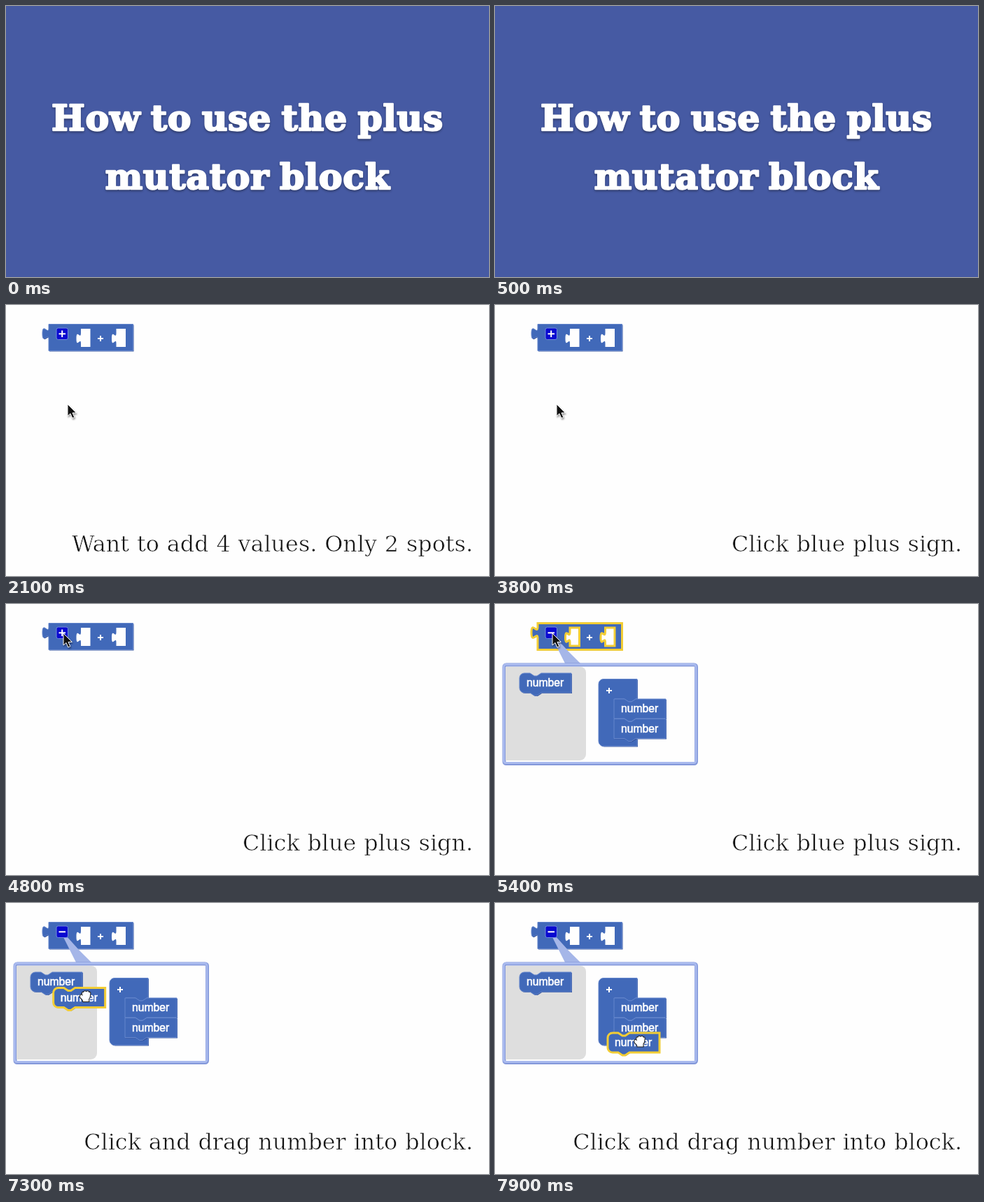
Write an HTML page that moves like this. It is 690 px wide and 388 px high and loops after 8 s.

```html
<!DOCTYPE html>
<html lang="en">
<head>
<meta charset="utf-8">
<title>How to use the plus mutator block</title>
<style>
  html, body { margin: 0; width: 100%; height: 100%; overflow: hidden; background: #fefefe; }
  svg { display: block; width: 690px; height: 388px; }
  .title { font: bold 50.5px "DejaVu Serif", serif; letter-spacing: .7px; word-spacing: -3.7px;
    fill: #fff; stroke: #fff; stroke-width: 2.4; stroke-linejoin: round; text-anchor: middle;
    filter: drop-shadow(0 2px 1.5px #0005); }
  /* the pale outline thins the strokes of the letters */
  #caption { font: 31.8px "DejaVu Serif", serif; word-spacing: .8px; fill: #111;
    stroke: #fefefe; stroke-width: .7; text-anchor: end; }
  .label { font: 15.7px "Liberation Sans", Arial, sans-serif; fill: #fff; stroke: #fff; stroke-width: .6; }
  .shade { fill: #2f4f98; }
  .body { fill: #4169b9; stroke: var(--edge, #6486cc); stroke-width: var(--line, 1); }
  .socket { fill: #fefefe; stroke: var(--edge, none); stroke-width: var(--line, 0); }
  .selected { --edge: #f2cd35; --line: 3; }
  .plus { stroke: #fff; stroke-width: 2; fill: none; }
</style>
</head>
<body>
<svg viewBox="0 0 690 388">
  <defs>
    <path id="numberShape" d="M0 7a7 7 0 0 1 7-7h8l6 4h4l6-4H74V28H31l-6 4h-4l-6-4H7a7 7 0 0 1-7-7z"/>
    <path id="stackedShape" d="M0 0H15l6 4h4l6-4H74V28H31l-6 4h-4l-6-4H0z"/>
    <path id="listShape" d="M155 107.5H203V136H201l-6 4h-4l-6-4H171V193H203V203.5H155a7 7 0 0 1-7-7V114.5a7 7 0 0 1 7-7z"/>
    <path id="sumShape" d="M61 27.5H181.5V65.5H61V49c0-11-9 9-9-8s9 3 9-8z"/>
    <path id="socket" class="socket" d="M107 34H120.5V60H107V55c0-10-6.5 8-6.5-7s6.5 3 6.5-8z"/>
    <g id="number">
      <use href="#numberShape" class="shade" x="1" y="1"/>
      <use href="#numberShape" class="body"/>
      <text class="label" x="10" y="19">number</text>
    </g>
    <g id="stacked">
      <use href="#stackedShape" class="shade" x="1" y="1"/>
      <use href="#stackedShape" class="body"/>
      <text class="label" x="10" y="19">number</text>
    </g>
    <g id="sum">
      <use href="#sumShape" class="shade" x="1" y="1"/>
      <use href="#sumShape" class="body"/>
      <use href="#socket"/>
      <use href="#socket" x="50.5"/>
      <path class="plus" d="M131 48h8M135 44v8"/>
    </g>
  </defs>

  <g id="intro">
    <rect width="690" height="388" fill="#465aa3"/>
    <text class="title" x="345" y="177.8">How to use the plus</text>
    <text class="title" x="345" y="262.3">mutator block</text>
  </g>

  <g id="lesson">
    <use id="sumBlock" href="#sum"/>
    <g id="bubble">
      <path d="M81 47L101 87H124Q104 68 86 47z" fill="#a5b6e8"/>
      <rect x="13" y="87" width="274.5" height="141.5" rx="3" fill="#fefefe" stroke="#8398da" stroke-width="5"/>
      <rect x="12.5" y="86.5" width="274.5" height="141" rx="3" fill="none" stroke="#a9baee" stroke-width="3"/>
      <path d="M15 90H122a8 8 0 0 1 8 8V215a9 9 0 0 1-9 9H15z" fill="#dedede"/>
      <use href="#number" x="35" y="99"/>
      <use href="#listShape" class="shade" x="1" y="1"/>
      <use href="#listShape" class="body"/>
      <path class="plus" d="M159 124h8M163 120v8"/>
      <use href="#stacked" x="170" y="136"/>
      <use href="#stacked" x="170" y="164.5"/>
      <use id="dragged" class="selected" href="#number"/>
    </g>
    <rect x="72" y="33" width="16.5" height="16.5" rx="2.5" fill="#0909d0" stroke="#7189dd"/>
    <path class="plus" d="M75.5 41.3h9.5"/>
    <path id="upright" class="plus" d="M80.2 36.5v9.5"/>
    <text id="caption" x="667" y="353"></text>

    <path id="arrow" d="M0 0V17L4 13.5 6.8 20 9.8 18.7 7 12.4H12.3z" fill="#111" stroke="#fff"
      style="filter:drop-shadow(1px 2px 1px #0006)"/>
    <path id="beam" d="M-4-9q4 0 4 3V6q0 3-4 3M4-9q-4 0-4 3V6q0 3 4 3M-2 3h4" fill="none" stroke="#222" stroke-width="1.3"/>
    <path id="hand" d="M-7-2q1-3 3-1-1-5 2-4 1-3 4-1 3-2 4 1 3-1 2 4 0 4-2 6v4h-9q0-3-3-5-2-2-1-4z"
      fill="#fff" stroke="#222" stroke-width="1.1"/>
  </g>
</svg>
<script>
  const LOOP = 8000, STEP = 100;
  const el = id => document.getElementById(id);
  const show = (id, on) => el(id).style.display = on ? "" : "none";
  const place = (id, [x, y]) => el(id).setAttribute("transform", `translate(${x} ${y})`);

  // eased point between a and b while t runs from start to end
  function glide(t, start, end, a, b) {
    const p = Math.min(1, Math.max(0, (t - start) / (end - start)));
    const k = p * p * (3 - 2 * p);
    return a.map((v, i) => v + (b[i] - v) * k);
  }

  const REST = [88, 142], ICON = [82, 42], GRIP = [80, 112], DROP = [206, 199];

  function pointer(t) {
    if (t < 5800) return glide(t, 3800, 4600, REST, ICON);
    if (t < 7000) return glide(t, 5800, 6600, ICON, GRIP);
    return glide(t, 7000, 7900, GRIP, DROP);
  }

  function draw(t) {
    const open = t >= 5200, dragging = t >= 7000;
    const [x, y] = pointer(t);
    const onText = t >= 5800 && y > 104;

    show("intro", t < 1800);
    show("lesson", t >= 1800);
    show("bubble", open);
    show("upright", !open);
    show("dragged", dragging);
    el("sumBlock").classList.toggle("selected", open && !dragging);
    el("caption").textContent =
      t < 3800 ? "Want to add 4 values. Only 2 spots." :
      t < 5800 ? "Click blue plus sign." : "Click and drag number into block.";

    show("arrow", !dragging && !onText);
    show("beam", !dragging && onText);
    show("hand", dragging);
    for (const id of ["arrow", "beam", "hand"]) place(id, [x, y]);
    place("dragged", [x - 45, y - 13]);
  }

  const begin = performance.now();
  function tick() {
    const t = (performance.now() - begin) % LOOP;
    draw(Math.floor(t / STEP) * STEP);
    requestAnimationFrame(tick);
  }
  tick();
</script>
</body>
</html>
```
